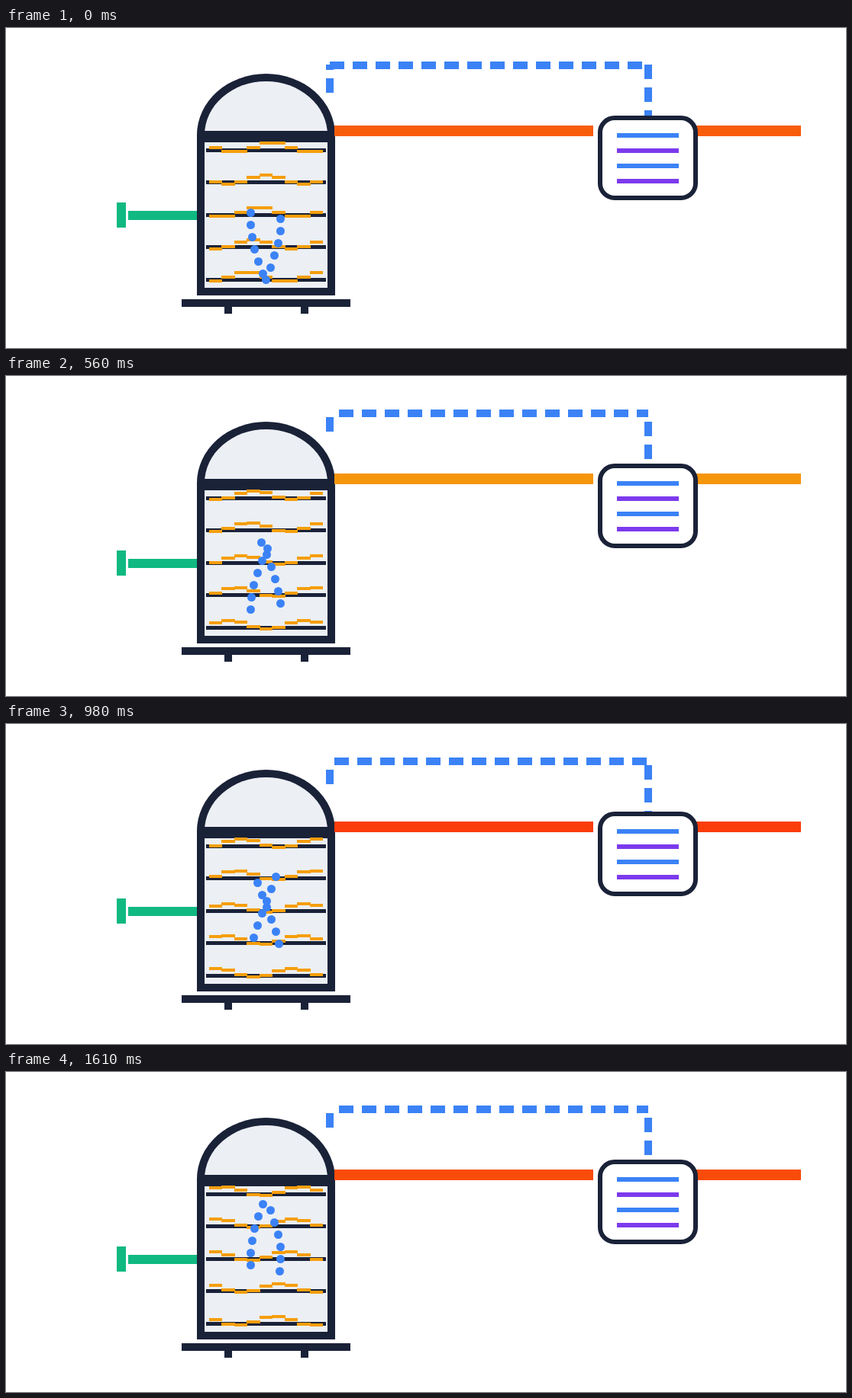
Write an HTML page with a canvas that moves like this. It is 1100 px wide and 420 px high and loops after 1680 ms.

```html
<!DOCTYPE html>
<html lang="en">
<head>
<meta charset="utf-8">
<title>Distillation column</title>
<style>
  html, body { margin: 0; width: 100%; height: 100%; overflow: hidden; background: #fff; }
  canvas { display: block; }
</style>
</head>
<body>
<canvas id="stage" width="1100" height="420"></canvas>
<script>
const ctx = document.getElementById('stage').getContext('2d');
const STEP_MS = 70, STEPS = 24;
const DARK = '#1a2238', PALE = '#eceff4', BLUE = '#3b82f6', PURPLE = '#7c3aed',
      AMBER = '#f59e0b', GREEN = '#10b981';

// Filled box given by its edges.
function box(color, left, top, right, bottom) {
  ctx.fillStyle = color;
  ctx.fillRect(left, top, right - left, bottom - top);
}

function ellipse(color, x, y, rx, ry, start = 0, end = 2 * Math.PI) {
  ctx.fillStyle = color;
  ctx.beginPath();
  ctx.ellipse(x, y, rx, ry, 0, start, end);
  ctx.fill();
}

// Calls draw(from, to) for every dash along a line, moving back 6 px per step.
function dashes(length, step, draw) {
  for (let d = -(step * 6 % 30); d < length; d += 30) {
    const from = Math.max(d, 0), to = Math.min(d + 18, length);
    if (to > from) draw(from, to);
  }
}

function drawReflux(step) {
  dashes(36, step, (a, b) => box(BLUE, 419, 84 - b, 429, 85 - a));
  dashes(416, step, (a, b) => box(BLUE, 424 + a, 44, 425 + b, 54));
  dashes(70, step, (a, b) => box(BLUE, 836, 48 + a, 846, 49 + b));
}

function drawPipe(step) {
  const heat = Math.sin(2 * Math.PI * step / STEPS);
  const color = `rgb(${Math.round(248 - 3 * heat)}, ${Math.round(93 + 65 * heat)}, 11)`;
  box(color, 430, 128, 769, 142);
  box(color, 903, 128, 1041, 142);
}

function drawColumn() {
  box(GREEN, 145, 229, 157, 262);
  box(GREEN, 160, 240, 251, 252);

  ellipse(DARK, 340.5, 140.5, 90.5, 80.5, Math.PI, 2 * Math.PI);
  ellipse(PALE, 340.5, 140.5, 80.5, 70.5, Math.PI, 2 * Math.PI);
  box(DARK, 251, 135, 430, 145);
  box(DARK, 250, 140, 431, 351);
  box(PALE, 260, 150, 421, 341);

  box(DARK, 230, 356, 451, 366);
  box(DARK, 286, 366, 296, 375);
  box(DARK, 386, 366, 396, 375);
}

function drawTrays(step) {
  for (let tray = 0; tray < 5; tray++) {
    const trayY = Math.floor(160 + tray * 42.5);
    box(DARK, 262, trayY - 2, 419, trayY + 3);
    for (let j = 0; j < 9; j++) {
      const degrees = 60 * j + 30 * tray + 10 * step;
      const y = Math.floor(trayY - 3 + 6 * Math.sin(degrees * Math.PI / 180) + 1e-9);
      const x = 266 + 16.5 * j;
      box(AMBER, Math.floor(x), y - 2, Math.floor(x + 16.5) + 1, y + 2);
    }
  }
}

function drawBubbles(step) {
  for (let i = 0; i < 12; i++) {
    const x = Math.floor(340 + 20 * Math.sin(0.6 * step + 3.3 * i));
    ellipse(BLUE, x + 0.5, 330.5 - 8 * i - 3 * step, 5.5, 5.5);
  }
}

function drawCondenser() {
  ctx.beginPath();
  ctx.roundRect(778, 118, 125, 105, 19);
  ctx.fillStyle = '#fff';
  ctx.fill();
  ctx.strokeStyle = DARK;
  ctx.lineWidth = 6;
  ctx.stroke();
  for (let i = 0; i < 4; i++) {
    box(i % 2 ? PURPLE : BLUE, 800, 138 + 20 * i, 881, 144 + 20 * i);
  }
}

function render(step) {
  box('#fff', 0, 0, 1100, 420);
  drawColumn();
  drawTrays(step);
  drawBubbles(step);
  drawPipe(step);
  drawReflux(step);
  drawCondenser();
}

const start = performance.now();
function tick() {
  render(Math.floor((performance.now() - start) / STEP_MS) % STEPS);
  requestAnimationFrame(tick);
}
tick();
</script>
</body>
</html>
```
